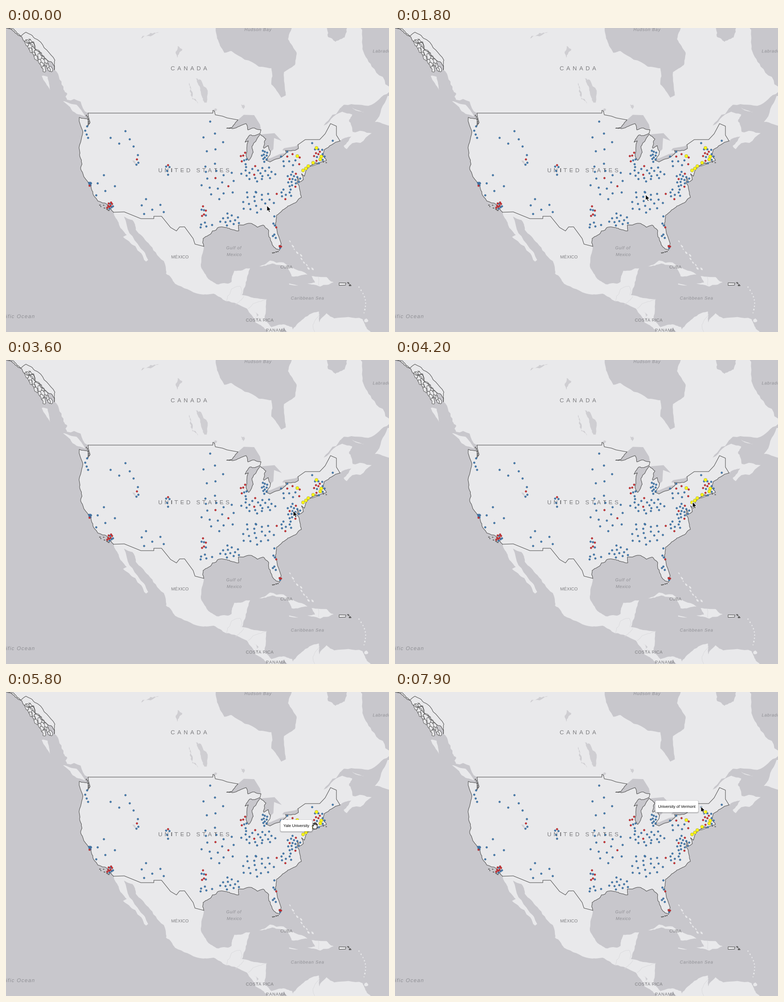
Write a matplotlib script that moves like this. It is 800 by 635 pixels and loops after 8000 ms.

```python
import numpy as np
import matplotlib.pyplot as plt
from matplotlib.animation import FuncAnimation
from matplotlib.patches import FancyBboxPatch, PathPatch, Polygon
from matplotlib.textpath import TextPath
from matplotlib.transforms import Affine2D

W, H, DPI = 800, 635, 100
STEP, LOOP = 100, 8000
PX = 72 / DPI
SEA, LAND, LINE = "#c8c7cc", "#e9e9eb", "#505050"
rng = np.random.default_rng(4)

fig = plt.figure(figsize=(W / DPI, H / DPI), dpi=DPI, facecolor=SEA)
ax = fig.add_axes([0, 0, 1, 1])
ax.set(xlim=(0, W), ylim=(H, 0))
ax.axis("off")


def geo(*v):
    """Web Mercator pixels from pairs of west longitude and latitude."""
    lon, lat = np.reshape(v, (-1, 2)).T
    y = np.log(np.tan(np.pi / 4 + np.radians(lat) / 2))
    return np.column_stack([1330.2 - 9.44 * lon, 710 - 541 * y])


def rough(p, k=0.07, times=3):
    """Fractal coast: push every midpoint sideways, again and again."""
    for _ in range(times):
        d = np.diff(p, axis=0)
        side = np.column_stack([-d[:, 1], d[:, 0]])
        out = np.empty((2 * len(p) - 1, 2))
        out[::2] = p
        out[1::2] = p[:-1] + d / 2 + side * rng.normal(0, k, (len(d), 1))
        p = out
    return p


def coast(*v, k=0.07):
    return rough(geo(*v), k)


def ring(p, k=0.08):
    return rough(np.vstack([p, p[:1]]), k)


def area(p, color=LAND, edge="none", lw=1.0, z=1):
    ax.add_patch(Polygon(p, fc=color, ec=edge, lw=lw * PX, zorder=z))


def line(p, color=LINE, lw=1.0, z=3):
    ax.plot(*p.T, color=color, lw=lw * PX, zorder=z, solid_joinstyle="round")


def blob(center, rx, ry, tilt=0.0, edge="none"):
    a = np.linspace(0, 2 * np.pi, 8)[:-1]
    c, s = np.cos(tilt), np.sin(tilt)
    p = np.column_stack([rx * np.cos(a), ry * np.sin(a)]) @ [[c, s], [-s, c]]
    area(ring(p + center, 0.15), LAND, edge, 0.8, 2)


# --- coasts and borders -----------------------------------------------------
alaska = coast(141.5, 60.1, 139.5, 59.6, 137, 58.4, 134.8, 58.3, 132, 56.2,
               130.2, 54.9, k=0.12)
panhandle = coast(141, 59.9, 139.2, 59.75, 137.6, 58.95, 136.5, 59.4,
                  133.8, 58.5, 130.1, 56.1, 130.2, 54.9, k=0.05)
canada_w = coast(130.2, 54.9, 128.2, 52.3, 127.4, 50.9, 122.76, 49, k=0.12)
pacific = coast(
    122.76, 49, 122.3, 47.6, 122.8, 47.1, 122.7, 48.1, 124.7, 48.38,
    123.9, 46.2, 124.55, 42.85, 124.1, 41, 124.4, 40.4, 123.7, 38.95,
    122.5, 37.8, 121.9, 36.5, 120.6, 34.6, 118.4, 33.9, 117.12, 32.53, k=0.05)
rio = geo(
    117.12, 32.53, 114.75, 32.6, 111.07, 31.33, 108.2, 31.33, 108.2, 31.78,
    106.5, 31.78, 104.5, 29.65, 103.2, 28.98, 102.5, 29.75, 101.4, 29.77,
    99.5, 27.5, 99.1, 26.4, 97.15, 25.95)
mexico_w = coast(
    117.12, 32.53, 116, 30.6, 114.2, 28.2, 115, 27.8, 112.3, 26,
    109.95, 22.9, 109.45, 23.2, 111.3, 25.8, 114.8, 31.7, 113, 31.1,
    112.2, 29.2, 109.4, 26.6, 106, 23, 105.5, 20.4, 103.5, 18.3,
    98, 16.1, 95, 16.2, 92.2, 14.6, k=0.05)
central = coast(
    92.2, 14.6, 87.6, 13, 85.7, 10, 82.9, 8.1, 80.6, 7.4, 79.5, 8.9,
    78, 7, 77, 7, 77.6, 9, 79.6, 9.6, 82.2, 9, 83.7, 10.9, 83.3, 15,
    88.7, 15.9, 87.6, 19.5, 86.9, 21.5, 90.4, 21, 91, 18.7, 94.3, 18.2,
    96.3, 19.5, 97.8, 22.3, 97.15, 25.95, k=0.05)
gulf = coast(
    97.15, 25.95, 97.3, 27.5, 95.2, 29, 93.8, 29.7, 91.5, 29.5, 89.4, 29,
    89.5, 30.1, 86.5, 30.4, 85.3, 29.7, 84, 30.1, 82.8, 29.1, 82.7, 27.8,
    81.7, 25.9, 80.4, 25.2)
atlantic = coast(
    80.4, 25.2, 80.03, 26.5, 81.3, 30.4, 81, 32, 79.2, 33.2, 77.9, 33.9,
    75.55, 35.25, 76, 36.9, 76.4, 38.9, 76, 38, 75.1, 38.4, 75.5, 39.4,
    74.9, 39, 74, 40.5, 72.5, 41.27, 70, 41.65, 70.8, 42.4, 70.5, 43.4,
    67, 44.8, k=0.05)
maine = geo(67, 44.8, 67.8, 45.7, 67.8, 47.07, 69.1, 47.45, 70.3, 45.9,
            71.5, 45.01, 74.7, 45, 76.3, 44.2)
canada_e = coast(
    67, 44.8, 64.5, 45.5, 66.2, 44, 65.5, 43.5, 60, 46, 64.2, 46.2, 65, 48,
    64.3, 48.8, 66.5, 49.2, 71.2, 46.8, 67, 49.7, 66, 50.2, 60, 50.2,
    55.7, 52.3, 60, 55.3, 62, 57.8, 64.4, 61)
area(np.vstack([alaska, canada_w, pacific, mexico_w, central, gulf,
                atlantic, canada_e, geo(141.5, 61)]))
area(coast(77.4, 8.6, 75.5, 10.5, 71.7, 12.4, 71.6, 10, 70, 12, 68.3, 10.9,
           62, 10.7, 60.8, 8.4, 58, 6, 78, 6, k=0.05))

# --- bays, lakes and islands ------------------------------------------------
area(coast(94.8, 60.5, 94.2, 58.7, 92.6, 57, 91, 57.2, 85, 55.3, 82.2, 55.1,
           82.2, 53, 80, 51.2, 79, 51.5, 79.4, 54.6, 77, 55.5, 76.6, 57,
           78.5, 58.6, 77.3, 60.5, k=0.04), SEA)
area(coast(70, 60.5, 69.7, 58.9, 68, 58.3, 66, 58.8, 65, 60.5), SEA)

ontario = coast(76.3, 44.2, 76.2, 43.6, 77, 43.28, 79.05, 43.26, k=0.03)
erie = coast(78.9, 42.9, 79.8, 42.25, 82.5, 41.4, 83.4, 41.7, k=0.03)
huron = coast(82.4, 43, 82.9, 44.07, 83.9, 43.65, 83.4, 45.1, 84.7, 45.8)
michigan = coast(
    84.7, 45.8, 85.6, 44.8, 86.5, 43.9, 86.2, 43, 87.2, 41.65, 87.8, 42.5,
    87.3, 44.8, 88, 44.6, 87, 45.7, 84.7, 45.95, k=0.05)
superior = coast(84.5, 46.5, 87.4, 46.5, 87.8, 47.45, 90.7, 46.7, 92.1, 46.75,
                 89.6, 48)
for shore, far in (
    (ontario, geo(79.8, 43.3, 79.4, 43.65, 76.9, 43.95)),
    (erie, geo(83.1, 42, 82.5, 42, 80.3, 42.7)),
    (huron, geo(81.5, 46, 79.9, 44.8, 81.6, 45.25, 81.75, 43.5)),
    (michigan, geo(84.7, 45.9)),
    (superior, geo(88.3, 48.75, 86, 48.7, 84.7, 47.3)),
):
    area(np.vstack([shore, far]), SEA)

for lake in (
    geo(98.9, 53.8, 97.7, 53.5, 96.5, 50.5, 97, 50.5, 97.8, 52),
    geo(100.4, 53.2, 99.7, 52, 98.4, 50.4, 99, 51, 100.2, 52),
    geo(102.9, 57.8, 101.9, 57.4, 103, 56.4),
    geo(111, 58.7, 109, 59.3, 107, 59.4),
    geo(88.9, 50.2, 88.2, 50.2, 88.4, 49.5),
    geo(95.2, 49.5, 94.2, 49.5, 94.9, 48.95),
    geo(113, 41.6, 112.5, 41.6, 112, 40.7),
    geo(85.9, 12.3, 85, 11.6, 85.3, 11.3),
):
    area(ring(lake, 0.12), "#cfced2")

for isle in (
    geo(128.3, 50.7, 125.3, 50.2, 123.4, 48.5, 125.3, 48.9),
    geo(133, 54.1, 131.7, 54, 131.1, 52.2),
    geo(59.3, 47.7, 56.5, 51.4, 55.6, 51.4, 55, 46.9),
    geo(64.5, 49.85, 61.7, 49.1, 63.5, 49.4),
    geo(84.9, 21.9, 82.5, 23.1, 79.5, 22.7, 74.2, 20.2, 77.7, 19.85,
        78.6, 21.5, 82, 22.5),
    geo(73.3, 19.9, 70, 19.7, 68.4, 18.6, 71.4, 17.7, 74.4, 18.4, 72.5, 18.6),
    geo(78.3, 18.35, 76.2, 17.9, 78.2, 18.1),
):
    area(ring(isle, 0.05))


def chain(start, end, n, rx, ry, tilt=0.0, spread=0.0, edge="none", bow=0.0):
    """Islands strung along a bowed line, uneven in size and place."""
    u = np.linspace(0, 1, n)[:, None]
    mid = geo(*start) * (1 - u) + geo(*end) * u
    mid[:, 0] += bow * np.sin(np.pi * u[:, 0])
    for c in mid + rng.normal(0, 1, (n, 2)) * spread:
        f = rng.uniform(0.6, 1.3)
        blob(c, rx * f, ry * f, tilt, edge)


chain((78.3, 26.6), (73.3, 21.2), 10, 1.3, 3, -0.6, 3)
chain((62.8, 17.6), (61.7, 12.1), 9, 1.4, 1.8, bow=8)
chain((61.2, 10.4), (61.2, 10.4), 1, 3.5, 3)
for shift in (-1, 0, 1):
    chain((136 + shift * 0.4, 58.2), (131.5 + shift * 0.7, 55), 8, 3.5, 6.5,
          -0.4, 1.5, LINE)
chain((120.2, 34), (118.2, 33), 6, 1.6, 0.7, 0.2, 1.5, LINE)
chain((123, 48.7), (122.5, 47.5), 5, 1.2, 1.4, 0, 0.8, LINE)
chain((81.9, 24.6), (80.7, 24.9), 4, 1.4, 0.5, 0, 0.3, LINE)
chain((70.7, 41.4), (70.05, 41.28), 2, 2, 0.8, 0, 0, LINE)
chain((65.3, 18.4), (64.7, 17.9), 5, 1.4, 0.6, 0, 1, LINE)

north = geo(89.6, 48, 92, 48.3, 93, 48.55, 94.6, 48.75, 94.8, 49.3,
            95.15, 49.38, 95.15, 49, 122.76, 49)
rivers = [geo(79.05, 43.26, 78.9, 42.9), geo(83.4, 41.7, 82.5, 42.6, 82.4, 43),
          geo(84.7, 45.95, 84.5, 46.5)]
for p in (alaska, panhandle, pacific, rio, gulf, atlantic, maine, north,
          ontario, erie, huron, michigan, superior, *rivers):
    line(p)
area(ring(geo(74, 40.6, 72.3, 41.15, 71.9, 41.05), 0.04), LAND, LINE, 0.8, 3)
area(geo(67.2, 18.5, 65.7, 18.45, 65.8, 18, 67.2, 17.95), LAND, LINE, 1, 3)

# Faint borders further south
for p in (geo(92.2, 14.6, 91, 17.2, 89.2, 17.8, 88.9, 15.9),
          geo(90.1, 13.8, 89.3, 14.5, 88.3, 15.6),
          geo(87.3, 13, 85, 14.5, 83.2, 15), geo(85.7, 11.1, 83.7, 10.9),
          geo(71.8, 19.7, 71.7, 18), geo(71.5, 11.8, 73, 9.5, 72.4, 7)):
    line(rough(p), "#dadadd", 0.8, 2)


# --- lettering --------------------------------------------------------------
def glyphs(s, size, **font):
    return TextPath((0, 0), s, size=size,
                    prop=dict(family="Liberation Sans", **font))


def advance(s, size, **font):
    wide = glyphs(f"|{s}|", size, **font).get_extents()
    return wide.x1 - glyphs("||", size, **font).get_extents().x1


def put(path, x, y, color, z):
    flip = Affine2D().scale(1, -1).translate(x, y)
    patch = PathPatch(flip.transform_path(path), fc=color, ec="none", zorder=z)
    return ax.add_patch(patch)


def label(s, x, y, size, gap, **font):
    color = "#8f8f94" if font else "#7b7b7e"
    for c in s:
        if c != " ":
            put(glyphs(c, size, **font), x, y + 0.36 * size, color, 4)
        x += advance(c, size, **font) + gap


for args in (("CANADA", 344, 84, 12, 5.2), ("UNITED STATES", 318, 297, 12, 4.5),
             ("MÉXICO", 345, 478, 9, 0.2), ("CUBA", 573, 499, 9, 0.1),
             ("COSTA RICA", 501, 610, 9, 0.3), ("PANAMÁ", 543, 631, 9, 0.6)):
    label(*args)
for args in (("Gulf of", 460, 459, 9, 0.8), ("Mexico", 461, 473, 9, 0.5),
             ("Caribbean Sea", 595, 564, 9, 0.75), ("Hudson Bay", 498, 3, 9, 0.8),
             ("Labrador Sea", 766, 48, 9, 0.7), ("ific Ocean", 0, 602, 11, 1.2)):
    label(*args, style="italic")


# --- campuses ---------------------------------------------------------------
def dots(p, size, color, edge, z):
    ax.scatter(*np.transpose(p), s=(size * PX) ** 2, c=color, edgecolors=edge,
               linewidths=0.5 * PX, zorder=z)


def spiral(x, y, rx, ry, n):
    """Evenly filled ellipse in random order."""
    i = np.arange(n) + 0.5
    a = i * 2.4 + rng.uniform(0, 6.3)
    r = np.sqrt(i / n)
    p = np.column_stack([x + rx * r * np.cos(a), y + ry * r * np.sin(a)])
    return rng.permutation(p)


# centre, radii, public and private campuses
REGIONS = [
    (169, 217, 4, 20, 4, 0), (248, 232, 32, 24, 5, 0), (274, 279, 3, 16, 3, 1),
    (175, 325, 3, 5, 5, 1), (205, 332, 32, 26, 5, 0), (217, 371, 7, 8, 4, 7),
    (300, 374, 36, 20, 6, 0), (337, 295, 4, 17, 4, 1), (430, 248, 28, 55, 8, 0),
    (445, 325, 42, 34, 14, 2), (412, 383, 7, 13, 3, 4), (416, 412, 20, 6, 5, 0),
    (468, 400, 22, 15, 12, 0), (497, 272, 8, 15, 3, 4), (540, 267, 8, 13, 10, 0),
    (525, 303, 38, 18, 20, 2), (525, 362, 36, 26, 19, 0),
    (582, 345, 20, 12, 7, 2), (560, 418, 5, 28, 6, 1), (572, 457, 2, 4, 1, 3),
    (600, 317, 15, 17, 14, 3), (592, 274, 26, 18, 7, 4), (653, 266, 12, 18, 10, 5),
]
public, private = [(522, 343), (639, 240), (682, 235)], []
for *place, blue, red in REGIONS:
    p = spiral(*place, blue + red)
    public.extend(p[:blue])
    private.extend(p[blue:])
ivy = [(648, 250), (607.5, 267), (658, 268), (656, 274), (641, 281),
       (631, 288), (626, 293), (620, 297)]
dots(public, 3.7, "#3f78ad", "#3d6186", 5)
dots(private, 3.7, "#cb282d", "#8f3a3a", 6)
dots(ivy, 6.8, "#fdf714", "#8a8a30", 7)

# --- tooltips and pointer ---------------------------------------------------
KEYS = np.array([
    (0, 545, 371), (900, 528, 358), (2200, 522, 345), (2800, 522, 345),
    (3600, 600, 315), (4400, 625.5, 293), (5000, 625.5, 293),
    (5500, 645, 279), (6000, 645, 279), (6900, 648, 250),
    (7400, 639, 239), (LOOP, 639, 239)])


def pointer(t):
    i = min(np.searchsorted(KEYS[:, 0], t, "right") - 1, len(KEYS) - 2)
    a, b = KEYS[i], KEYS[i + 1]
    u = (t - a[0]) / (b[0] - a[0])
    return a[1:] + (b[1:] - a[1:]) * u * u * (3 - 2 * u)


def tooltip(s, x, y):
    size, pad, half = 8.2, 6, 12
    w = advance(s, size) + 2 * pad
    left = x - 5.5 - w

    def box(grow, drop, **style):
        shape = FancyBboxPatch(
            (left - grow, y - half - grow + drop), w + 2 * grow,
            2 * (half + grow), lw=0,
            boxstyle=f"round,pad=0,rounding_size={3 + grow}", **style)
        return ax.add_patch(shape)

    parts = [box(g, 1, fc="black", alpha=0.07, zorder=8) for g in (2, 1.2, 0.5)]
    parts.append(box(0, 0, fc="white", zorder=9))
    parts.append(put(glyphs(s, size), left + pad, y + 0.36 * size, "black", 10))
    return parts


TIPS = [(start, end, tooltip(name, *pointer(start))) for start, end, name in (
    (2200, 2800, "Tennessee Technological University"),
    (4400, 5000, "Princeton University"),
    (5500, 6000, "Yale University"),
    (7400, LOOP, "University of Vermont"))]

ARROW = np.array([(0, 0), (0, 12), (2.7, 9.6), (4.7, 14), (6.8, 13.1),
                  (4.9, 8.9), (8.6, 8.6)])
HAND = np.array([(-3, 7), (-5.5, 1), (-4.5, -0.5), (-2.5, 1.5), (-3.5, -4),
                 (-2, -5), (-0.8, -1), (-0.6, -6), (1, -6), (1.4, -1),
                 (2, -5.4), (3.4, -5), (3.4, -0.5), (4.6, -3), (5.4, -2),
                 (4.6, 4), (3.6, 7)])
arrow = ax.add_patch(Polygon(ARROW, fc="black", ec="white", lw=0.9 * PX, zorder=12))
hand = ax.add_patch(Polygon(HAND, fc="white", ec="black", lw=PX, zorder=12))


def draw(n):
    t = n * STEP
    for start, end, parts in TIPS:
        for part in parts:
            part.set_visible(start <= t < end)
    grab = 5500 <= t < 6000
    pos = pointer(t)
    arrow.set_xy(ARROW + pos)
    hand.set_xy(HAND + pos)
    arrow.set_visible(not grab)
    hand.set_visible(grab)
    return []


anim = FuncAnimation(fig, draw, frames=LOOP // STEP, interval=STEP,
                     init_func=lambda: [], repeat=True, repeat_delay=0)
plt.show()
```
